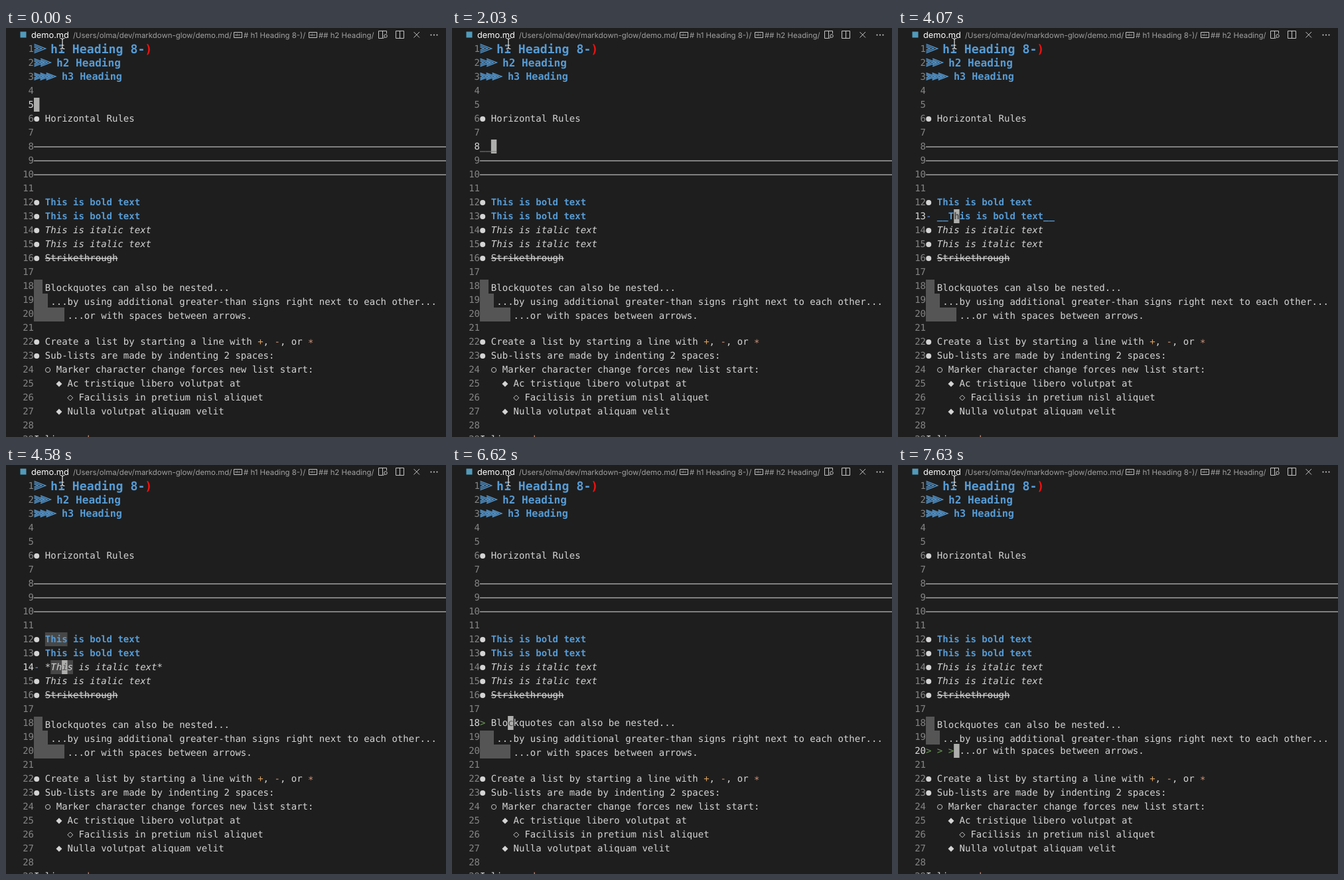
Recreate the animation shown at these times as an HTML page. Size 663 by 616 pixels, loop 8 s.

```html
<!DOCTYPE html>
<html lang="en">
<head>
<meta charset="utf-8">
<title>Markdown editor</title>
<style>
  html, body { margin: 0; width: 100%; height: 100%; overflow: hidden; background: #1e1e1e; }
  svg { display: block; }
  text { font: 14px "DejaVu Sans Mono", monospace; fill: #d4d4d4; white-space: pre; text-rendering: geometricPrecision; }
  .num { fill: #858585; text-anchor: end; }
  .num.on { fill: #dcdcdc; }
  .bold { font-weight: bold; fill: #569cd6; }
  .italic { font-style: italic; }
  .strike { text-decoration: line-through; }
  .dash { fill: #6796e6; }
  .quote { fill: #6a9955; }
  .code { fill: #ce9178; }
  .plus { fill: #d7a05f; }
  .bad { fill: #ee1111; }
  .under { fill: #515052; }
  .bar text { font: 11.4px Inter, sans-serif; fill: #a0a0a0; }
  .bar .tab { font-size: 12.8px; fill: #fff; }
  .bar .abc { font-size: 5px; fill: #c5c5c5; }
  .line { fill: none; stroke: #c5c5c5; }
</style>
</head>
<body>
<svg width="663" height="616" viewBox="0 0 663 616">
  <g class="bar">
    <rect x="21.5" y="5.5" width="9" height="9" fill="#519aba"/>
    <text class="tab" x="38" y="15">demo.md</text>
    <text x="101" y="15">/Users/olma/dev/markdown-glow/demo.md/</text>
    <text x="358" y="15"># h1 Heading 8-)/</text>
    <text x="471" y="15">## h2 Heading/</text>
    <text class="abc" x="345" y="12.3">abc</text>
    <text class="abc" x="458" y="12.3">abc</text>
    <path class="line" d="M343.5 6.5h12v8h-12zM456.5 6.5h12v8h-12z"/>
    <path class="line" d="M567.5 15.5h-6v-11h12v4M567.5 4.5v11M587.5 4.5h12v11h-12zM593.5 4.5v11M614.5 6l8.5 8.5M623 6l-8.5 8.5"/>
    <circle class="line" cx="572" cy="12" r="2.3"/>
    <path class="line" d="M570.3 13.8l-2 2.2"/>
    <g fill="#c5c5c5"><circle cx="640.5" cy="10.5" r="1.1"/><circle cx="645" cy="10.5" r="1.1"/><circle cx="649.5" cy="10.5" r="1.1"/></g>
  </g>
  <g id="page"></g>
  <g id="mouse" fill="none"></g>
</svg>
<script>
const LEFT = 42, CHAR = 8.428, ROW = 21, LOOP = 8000;
const page = document.getElementById('page');
const colX = col => LEFT + col * CHAR;

const text = (n, col, str, cls = '', dy = 15) =>
  `<text x="${colX(col)}" y="${n * ROW + dy}" class="${cls}">${str}</text>`;
const span = (str, cls) => `<tspan class="${cls}">${str}</tspan>`;
const box = (n, col, len, fill, dy = 0) =>
  `<rect x="${colX(col)}" y="${n * ROW + dy}" width="${len * CHAR}" height="${ROW}" fill="${fill}"/>`;

const marks = {
  disc: '<circle r="4" fill="#d4d4d4"/>',
  ring: '<circle r="3.6" class="line"/>',
  gem: '<path d="M-4.5 0L0-4.5 4.5 0 0 4.5z" fill="#d4d4d4"/>',
  hollow: '<path d="M-4 0L0-4 4 0 0 4z" class="line"/>'
};
const item = (str, cls = '', mark = 'disc', col = 0) => n =>
  `<g transform="translate(${colX(col) + 4.2} ${n * ROW + 11})">${marks[mark]}</g>` + text(n, col + 2, str, cls);

// Nested chevrons, one group per heading level
const heading = (level, size, x, str) => n => {
  let d = '';
  for (let i = 0; i < level; i++)
    for (const k of [1, 0.66, 0.33])
      d += `M${LEFT + 0.5 + i * size * 0.602} ${n * ROW + 10 - size * 0.36 * k}l${size * 0.94 * k} ${size * 0.36 * k} ${-size * 0.94 * k} ${size * 0.36 * k}`;
  return `<path d="${d}" fill="none" stroke="#569cd6" stroke-width="1.3"/>` +
    `<text class="bold" x="${x}" y="${n * ROW + 10 + size * 0.36}" style="font-size:${size}px">${str}</text>`;
};
const rule = n => `<rect x="${LEFT}" y="${n * ROW + 10}" width="621" height="2" fill="#808080"/>`;
const quote = (width, col, str) => n =>
  `<rect x="${LEFT}" y="${n * ROW + 1}" width="${width}" height="${ROW}" fill="#555"/>` + text(n, col, str, '', 17.5);

const nested = 'Blockquotes can also be nested...';
const signs = '...by using additional greater-than signs right next to each other...';
const arrows = '...or with spaces between arrows.';

const rendered = {
  1: heading(1, 18.2, 67, 'h1 Heading 8-' + span(')', 'bad')),
  2: heading(2, 16.1, 76, 'h2 Heading'),
  3: heading(3, 15.1, 84, 'h3 Heading'),
  6: item('Horizontal Rules'),
  8: rule, 9: rule, 10: rule,
  12: item('This is bold text', 'bold'),
  13: item('This is bold text', 'bold'),
  14: item('This is italic text', 'italic'),
  15: item('This is italic text', 'italic'),
  16: item('Strikethrough', 'strike'),
  18: quote(13, 2, nested),
  19: quote(21, 3, signs),
  20: quote(46, 6, arrows),
  22: item(`Create a list by starting a line with ${span('+', 'plus')}, ${span('-', 'code')}, or <tspan class="code" dy="2">*</tspan>`),
  23: item('Sub-lists are made by indenting 2 spaces:'),
  24: item('Marker character change forces new list start:', '', 'ring', 2),
  25: item('Ac tristique libero volutpat at', '', 'gem', 4),
  26: item('Facilisis in pretium nisl aliquet', '', 'hollow', 6),
  27: item('Nulla volutpat aliquam velit', '', 'gem', 4),
  29: n => text(n, 0, 'Inline ' + span('code', 'code'))
};

// Source shown on the active line: prefix, prefix class, body, body class
const source = {
  5: ['', '', '', ''],
  6: ['- ', 'dash', 'Horizontal Rules', ''],
  8: ['', '', '___', ''],
  9: ['', '', '---', ''],
  10: ['', '', '***', ''],
  12: ['- ', 'dash', '**This is bold text**', 'bold'],
  13: ['- ', 'dash', '__This is bold text__', 'bold'],
  14: ['- ', 'dash', '*This is italic text*', 'italic'],
  15: ['- ', 'dash', '_This is italic text_', 'italic'],
  16: ['- ', 'dash', '~~Strikethrough~~', 'strike'],
  18: ['> ', 'quote', nested, ''],
  19: ['>> ', 'quote', signs, ''],
  20: ['> > > ', 'quote', arrows, '']
};

// Start time, active line, cursor column (-1 = blinked off), highlights [line, column, length]
const steps = [
  [0, 5, 0],
  [500, 6, 5, [[6, 2, 10]]],
  [1010, 8, 2],
  [1520, 9, 2],
  [2030, 8, 2],
  [2540, 9, 2],
  [3050, 10, -1],
  [3560, 12, 5],
  [4070, 13, 5],
  [4580, 14, 5, [[12, 2, 4], [14, 3, 4]]],
  [5090, 15, 5],
  [5600, 15, -1, [[12, 2, 4], [14, 2, 4]]],
  [6110, 16, 5],
  [6620, 18, 5],
  [7120, 19, 5],
  [7630, 20, 5]
];

function active(n, cursor) {
  const [prefix, prefixCls, body, bodyCls] = source[n];
  let out = text(n, 0, prefix, prefixCls) + text(n, prefix.length, body, bodyCls, n === 10 ? 17 : 15);
  if (cursor >= 0) {
    const ch = (prefix + body)[cursor] || '';
    const cls = cursor < prefix.length ? '' : bodyCls;
    out += box(n, cursor, 1, '#aeafad') + `<g style="--c:0">${text(n, cursor, span(ch, 'under'), cls)}</g>`;
  }
  return out;
}

function draw([, line, cursor, lights = []]) {
  let out = lights.map(([n, col, len]) => box(n, col, len, '#474747')).join('');
  for (let n = 1; n <= 29; n++) {
    const on = n === line;
    out += `<text class="num ${on ? 'on' : ''}" x="${LEFT}" y="${n * ROW + 15}">${n}</text>`;
    if (on) out += active(n, cursor);
    else if (rendered[n]) out += rendered[n](n);
  }
  page.innerHTML = out;
}

const beam = 'M81.5 15.5q3.5 0 3.5 2.5v11q0 2.5-3.5 2.5M88.5 15.5q-3.5 0-3.5 2.5v11q0 2.5 3.5 2.5M82.5 26h5';
document.getElementById('mouse').innerHTML =
  `<path d="${beam}" stroke="#111" stroke-width="3"/><path d="${beam}" stroke="#eee" stroke-width="1.2"/>`;

let shown;
function tick() {
  const t = performance.now() % LOOP;
  const step = steps.findLast(s => s[0] <= t);
  if (step !== shown) draw(shown = step);
  requestAnimationFrame(tick);
}
tick();
</script>
</body>
</html>
```
